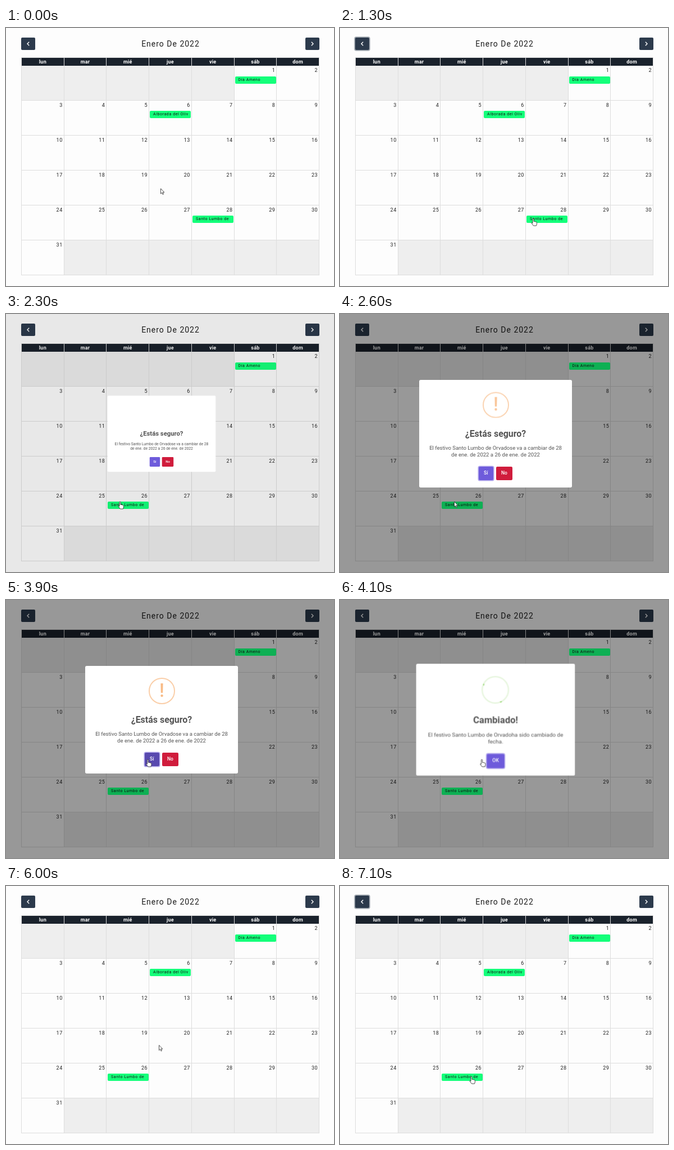
These frames come from a looping animation (584x458 px, 8 s). An HTML page:

```html
<!DOCTYPE html>
<html lang="es">
<head>
<meta charset="utf-8">
<title>Calendario</title>
<style>
  html, body { margin: 0; width: 100%; height: 100%; overflow: hidden; }
  body { position: relative; background: #fdfdfd; font-family: Roboto, sans-serif; color: #222; }
  body * { box-sizing: border-box; }
  .abs, .event, .nav, .popup, .popup > *, .icon * { position: absolute; }

  /* Calendar */
  h1 { left: 192.5px; width: 201px; top: 18px; margin: 0; text-align: center; font: 400 14px/20px Roboto, sans-serif; letter-spacing: 1px; color: #1c1c1c; }
  .nav { top: 17px; width: 25px; height: 22px; border-radius: 2px; background: #2c3a4c; }
  .nav path { fill: none; stroke: #fff; stroke-width: 1.4; }
  .cal { left: 27px; top: 52px; width: 531px; display: grid; grid-template: 14px repeat(6, 62px) / repeat(7, 1fr); border: solid #ddd; border-width: 1px 0 0 1px; }
  .cal > div { border: solid #ddd; border-width: 0 1px 1px 0; padding: 3px 2px; text-align: right; font-size: 9px; line-height: 11px; letter-spacing: .5px; }
  .cal > .head { background: #1a222c; color: #fff; font-weight: 700; line-height: 14px; padding: 0; text-align: center; letter-spacing: .25px; border-bottom: 0; }
  .cal > .out { background: #eee; }
  .event { width: 73px; height: 13px; padding: 0 5px 0 6px; border-radius: 2px; background: #14ff7a; color: #111; font-size: 7px; line-height: 13px; letter-spacing: .6px; white-space: nowrap; overflow: hidden; }
  .event span { display: block; overflow: hidden; }

  /* Dialogs */
  .shade { inset: 0; background: #000; opacity: 0; }
  .popup { left: 141px; top: 117px; width: 272px; height: 191px; border-radius: 2.7px; background: #fff; text-align: center; visibility: hidden; }
  .popup h2 { left: 0; right: 0; top: 86px; margin: 0; font-size: 15.94px; line-height: 20px; font-weight: 600; color: #545454; }
  .popup p { left: 0; right: 0; top: 115.4px; margin: 0; font-size: 9.56px; line-height: 11.5px; color: #545454; white-space: nowrap; }
  .actions { left: 0; right: 0; top: 154.2px; display: flex; justify-content: center; gap: 5px; }
  .actions b { padding: 0 9.35px; height: 23.6px; border-radius: 2.1px; font-size: 8.5px; line-height: 23.6px; font-weight: 500; color: #fff; background: #6e5bdb; }
  .actions .no { background: #d01c3c; }
  .icon { left: 112.6px; top: 21.1px; font-size: 8.5px; width: 5.5em; height: 5.5em; border: .25em solid #facea8; border-radius: 50%; }
  .icon .mark { inset: 0; font-size: 33px; line-height: 42.5px; font-weight: 500; color: #f8bb86; }
  .ok { border-color: #a5dc86; }
  .mask { width: 3.75em; height: 7.5em; background: #fff; transform: rotate(-45deg); }
  .mask.l { top: -.4375em; left: -2.0635em; transform-origin: 3.75em 3.75em; border-radius: 7.5em 0 0 7.5em; }
  .mask.r { top: -.6875em; left: 1.875em; transform-origin: 0 3.75em; border-radius: 0 7.5em 7.5em 0; }
  .seam { top: -.5em; left: 2.1em; width: .8em; height: 6em; background: #fff; transform: rotate(-45deg); }
  .ring { inset: -.25em; border: .25em solid rgba(165, 220, 134, .3); border-radius: 50%; }
  .line { height: .3125em; border-radius: .125em; background: #a5dc86; }
  .tip { transform: rotate(45deg); }
  .long { transform: rotate(-45deg); }

  /* Pointer */
  .cursor { left: -4px; top: -1px; width: 16px; height: 18px; overflow: hidden; }
  .cursor svg { display: block; }
  .cursor path { fill: #fff; stroke: #222; stroke-width: .8; stroke-linejoin: round; }

  /* Every track shares one 8 s loop: 1% is 80 ms */
  .cursor { animation: move 8s ease-in-out infinite; }
  .cursor svg { animation: kind 8s step-end infinite; }
  .event { animation: dim 8s linear infinite; }
  .drag { left: 331px; top: 315px; width: 75px; height: 61px; animation: drag 8s step-end infinite; }
  .drag .event { animation: dim 8s linear infinite, lift 8s step-end infinite; }
  .glow { inset: 0; background: rgba(188, 232, 241, .3); opacity: 0; animation: glow 8s step-end infinite; }
  .prev { animation: focus 8s step-end infinite; }
  .shade { animation: shade 8s linear infinite; }
  .ask { animation: ask 8s infinite; }
  .done { animation: done 8s infinite; }
  .warn { animation: flip 8s infinite; }
  .mark { animation: wobble 8s infinite; }
  .tip { animation: tip 8s infinite; }
  .long { animation: long 8s infinite; }
  .mask.r { animation: sweep 8s infinite; }
  .yes { animation: ringYes 8s linear infinite, pressYes 8s step-end infinite; }
  .fine { animation: ringFine 8s linear infinite, pressFine 8s step-end infinite; }

  @keyframes move {
    0%, 3% { transform: translate(275px, 285px); }
    13.75%, 17% { transform: translate(344px, 338px); }
    24.5%, 37.6% { transform: translate(203px, 333px); }
    43.75%, 58% { transform: translate(252.5px, 283px); }
    62.4%, 76.5% { transform: translate(272px, 282.5px); }
    87.5%, 100% { transform: translate(234px, 338px); }
  }
  @keyframes kind {
    0%, 29%, 52%, 74%, 100% { transform: none; }
    12.5%, 42.2%, 60.5%, 88.7% { transform: translateX(-16px); }
  }
  @keyframes drag {
    0% { transform: none; }
    18.9% { transform: translateX(-76px); }
    21.6%, 100% { transform: translateX(-151px); }
  }
  @keyframes lift { 0%, 25%, 100% { opacity: 1; } 17.5% { opacity: .75; } }
  @keyframes glow { 0%, 25%, 100% { opacity: 0; } 17.5% { opacity: 1; } }
  @keyframes focus {
    0%, 28.6% { box-shadow: none; }
    16.2%, 77.5%, 100% { box-shadow: 0 0 0 1.8px rgba(76, 91, 106, .5); }
  }
  @keyframes shade {
    0%, 28.5%, 49.91%, 73.6%, 100% { opacity: 0; }
    29.75%, 49.9%, 51.15%, 72.35% { opacity: .4; }
  }
  @keyframes dim {
    0%, 28.5%, 49.91%, 73.6%, 100% { filter: brightness(1); }
    29.75%, 49.9%, 51.15%, 72.35% { filter: brightness(.69); }
  }
  @keyframes ask {
    0%, 28.69% { transform: scale(.7); visibility: hidden; }
    28.7% { transform: scale(.7); visibility: visible; }
    30.39% { transform: scale(1.05); }
    31.7% { transform: scale(.95); }
    32.45%, 49.93% { transform: none; visibility: visible; }
    49.94%, 100% { transform: none; visibility: hidden; }
  }
  @keyframes done {
    0%, 49.93% { transform: scale(.7); visibility: hidden; }
    49.94% { transform: scale(.7); visibility: visible; }
    51.63% { transform: scale(1.05); }
    52.94% { transform: scale(.95); }
    53.69%, 72.35% { transform: none; opacity: 1; visibility: visible; }
    74.2% { transform: scale(.5); opacity: 0; visibility: visible; }
    74.21%, 100% { transform: scale(.5); opacity: 0; visibility: hidden; }
  }
  @keyframes flip {
    0%, 28.7% { transform: rotateX(100deg); opacity: 0; }
    34.95%, 100% { transform: rotateX(0deg); opacity: 1; }
  }
  @keyframes wobble {
    0%, 28.7% { transform: rotate(45deg); opacity: 0; }
    30.26% { transform: rotate(-25deg); opacity: .4; }
    31.82% { transform: rotate(15deg); opacity: .8; }
    33.39% { transform: rotate(-5deg); opacity: 1; }
    34.95%, 100% { transform: rotate(0deg); opacity: 1; }
  }
  @keyframes tip {
    0%, 54.96% { top: 1.0625em; left: .125em; width: 0; }
    56.46% { top: 2.1875em; left: -.375em; width: 3.125em; }
    57.78% { top: 3em; left: 1.3125em; width: 1.0625em; }
    59.28%, 100% { top: 2.8125em; left: .8125em; width: 1.5625em; }
  }
  @keyframes long {
    0%, 55.99% { top: 3.375em; right: 2.875em; width: 0; }
    57.78% { top: 2.1875em; right: 0; width: 3.4375em; }
    59.28%, 100% { top: 2.375em; right: .5em; width: 2.9375em; }
  }
  @keyframes sweep {
    0%, 52.56% { transform: rotate(-45deg); }
    56.28%, 100% { transform: rotate(-405deg); }
  }
  @keyframes ringYes {
    0%, 28.7% { box-shadow: 0 0 0 1.6px rgba(110, 91, 219, 0); }
    30%, 100% { box-shadow: 0 0 0 1.6px rgba(110, 91, 219, .5); }
  }
  @keyframes ringFine {
    0%, 49.9% { box-shadow: 0 0 0 1.6px rgba(110, 91, 219, 0); }
    51.2%, 100% { box-shadow: 0 0 0 1.6px rgba(110, 91, 219, .5); }
  }
  @keyframes pressYes {
    0% { background-color: #6e5bdb; }
    42.2% { background-color: #6352c5; }
    47.5%, 100% { background-color: #5849af; }
  }
  @keyframes pressFine {
    0% { background-color: #6e5bdb; }
    60.5% { background-color: #6755cd; }
    71.8%, 100% { background-color: #5849af; }
  }
</style>
</head>
<body>
  <div class="nav prev" style="left:27px"><svg width="25" height="22"><path d="M14.2 7.8L11 11l3.2 3.2"/></svg></div>
  <h1 class="abs">Enero De 2022</h1>
  <div class="nav" style="left:533px"><svg width="25" height="22"><path d="M10.8 7.8L14 11l-3.2 3.2"/></svg></div>

  <div class="abs cal" id="cal"></div>
  <div class="abs shade"></div>

  <!-- Events dim less than the page, so they lie above the shade -->
  <div class="event" style="left:407.5px;top:85.5px"><span>Día Ameno</span></div>
  <div class="event" style="left:256px;top:147px"><span>Alborada del Oliva</span></div>
  <div class="abs drag">
    <div class="abs glow"></div>
    <div class="event" style="left:1px;top:18px"><span>Santo Lumbo de</span></div>
  </div>

  <div class="popup ask">
    <div class="icon warn"><div class="mark">!</div></div>
    <h2>¿Estás seguro?</h2>
    <p>El festivo Santo Lumbo de Orvadose va a cambiar de 28<br>de ene. de 2022 a 26 de ene. de 2022</p>
    <div class="actions"><b class="yes">Sí</b><b class="no">No</b></div>
  </div>

  <div class="popup done">
    <div class="icon ok">
      <i class="mask l"></i><i class="mask r"></i><i class="seam"></i>
      <i class="ring"></i>
      <i class="line tip"></i><i class="line long"></i>
    </div>
    <h2>Cambiado!</h2>
    <p>El festivo Santo Lumbo de Orvadoha sido cambiado de<br>fecha.</p>
    <div class="actions"><b class="fine">OK</b></div>
  </div>

  <div class="abs cursor">
    <svg width="32" height="18">
      <path d="M4.5 1v9.2l2.1-1.9 1.5 3.2 1.4-.6-1.5-3.1h2.9z"/>
      <path transform="translate(16 .5)" d="M3 9V1.6a1 1 0 0 1 2 0V6q1.6-.8 2 .4 1.6-.6 2 .5 1.4-.2 1.4 1v2.6l-.9 3H4.5L.8 8.8q.7-1.3 2.2.2z"/>
    </svg>
  </div>

<script>
  const cal = document.getElementById('cal');
  function addCell(text, kind) {
    const cell = document.createElement('div');
    cell.textContent = text;
    cell.className = kind;
    cal.append(cell);
  }
  for (const name of ['lun', 'mar', 'mié', 'jue', 'vie', 'sáb', 'dom']) addCell(name, 'head');
  for (let i = 0; i < 42; i++) {
    const day = i - 4;
    if (day >= 1 && day <= 31) addCell(day, 'day');
    else addCell('', 'out');
  }
</script>
</body>
</html>
```
